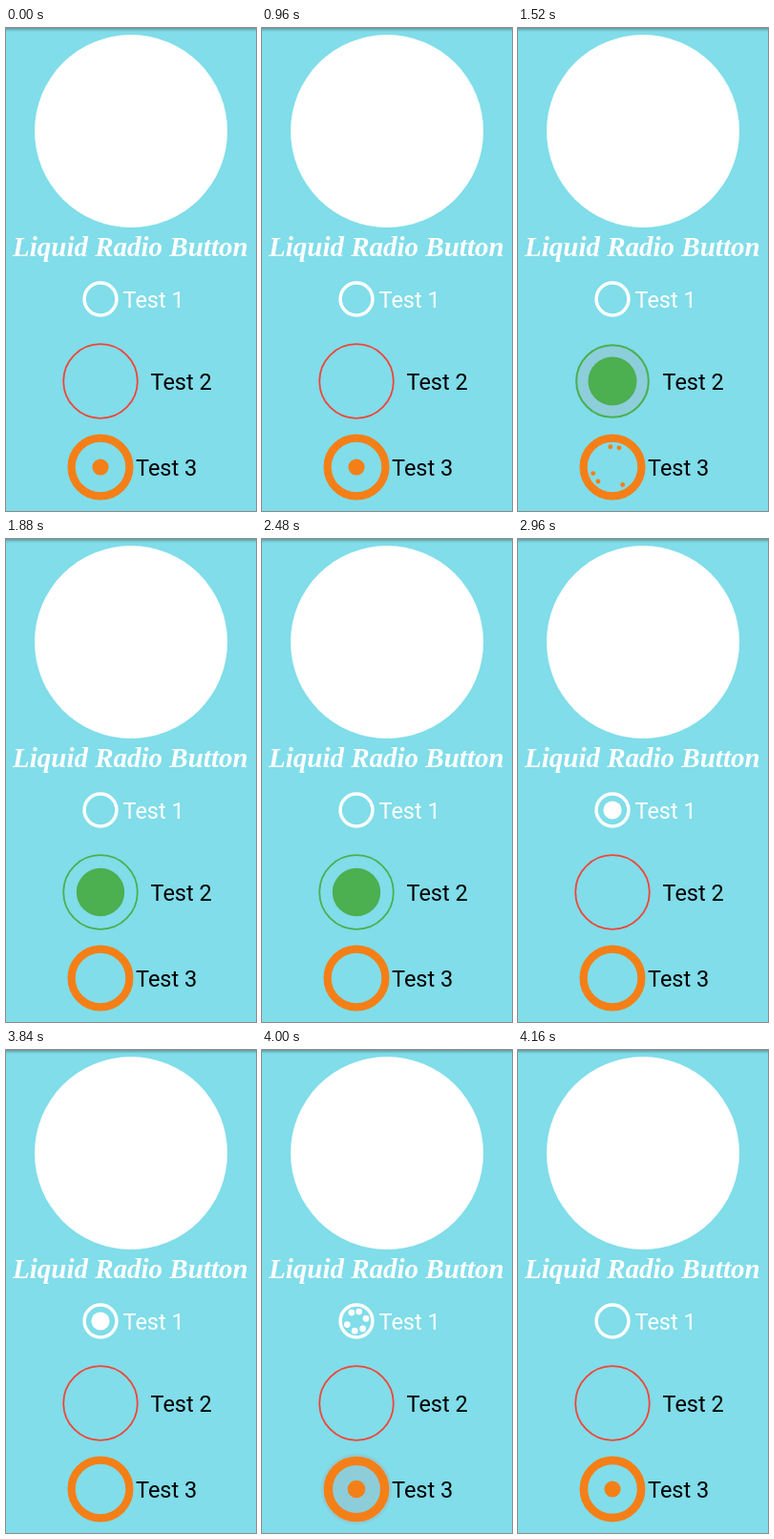
Animation, 262 px wide and 506 px high, one loop 4200 ms. Source, as an HTML page:

```html
<!DOCTYPE html>
<html lang="en">
<head>
<meta charset="utf-8">
<title>Liquid Radio Button</title>
<style>
  html, body { margin: 0; width: 100%; height: 100%; overflow: hidden; background: #80dde9; }
  svg { display: block; width: 100vw; height: 100vh; }
  .label { font: 23.5px Roboto, sans-serif; }
  .title { font: italic bold 29px "Liberation Serif", serif; fill: #fff; }
</style>
</head>
<body>
<svg id="stage" viewBox="0 0 262 506">
  <defs>
    <linearGradient id="shade" x2="0" y2="1">
      <stop offset="0" stop-color="#5f8d95" stop-opacity=".9"/>
      <stop offset=".4" stop-color="#64a2ab" stop-opacity=".55"/>
      <stop offset="1" stop-color="#80dde9" stop-opacity="0"/>
    </linearGradient>
  </defs>
  <rect width="262" height="506" fill="#80dde9"/>
  <rect width="262" height="5" fill="url(#shade)"/>
  <circle cx="131" cy="108" r="101" fill="#fff"/>
  <text class="title" x="7" y="239">Liquid Radio Button</text>
</svg>
<script>
const LOOP = 4200, BURST = 300, CX = 99;
const stage = document.getElementById('stage');

const buttons = [
  { y: 284, r: 16.9, line: 3.5, dot: 9.6, halo: 32, on: '#fff', off: '#fff', text: 'Test 1', tx: 122.5, ty: 293, ink: '#fff' },
  { y: 370, r: 38.8, line: 1.8, dot: 25.2, halo: 37, on: '#4caf50', off: '#f44336', text: 'Test 2', tx: 151.5, ty: 379, ink: '#000' },
  { y: 460, r: 30.4, line: 8.2, dot: 8.6, halo: 37, on: '#f57f17', off: '#f57f17', text: 'Test 3', tx: 136, ty: 469, ink: '#000' }
];

// Each selection: time, button left, button chosen, droplet angles in degrees.
const picks = [
  { at: 1340, from: 2, to: 1, angles: [-96, -71, 162, 135, 60] },
  { at: 2540, from: 1, to: 0, angles: [-137, -108, -26, 51, 90, 135] },
  { at: 3860, from: 0, to: 2, angles: [-120, -75, -15, 50, 100, 160] }
];

const clamp = v => Math.max(0, Math.min(1, v));
const bell = v => Math.sin(Math.PI * clamp(v));

function easeBack(v) {
  const k = v - 1, s = 1.7;
  return 1 + (s + 1) * k ** 3 + s * k ** 2;
}

function add(tag, attrs, parent = stage) {
  const el = document.createElementNS('http://www.w3.org/2000/svg', tag);
  set(el, attrs);
  return parent.appendChild(el);
}

function set(el, attrs) {
  for (const key in attrs) el.setAttribute(key, attrs[key]);
}

for (const b of buttons) {
  const g = add('g', { transform: `translate(${CX} ${b.y})` });
  b.haloEl = add('circle', { fill: '#b09ba8' }, g);
  b.ringEl = add('circle', { fill: 'none' }, g);
  b.dotEl = add('circle', { fill: b.on }, g);
  b.drops = Array.from({ length: 6 }, () => add('circle', { fill: b.off }, g));
  add('text', { class: 'label', x: b.tx, y: b.ty, fill: b.ink }).textContent = b.text;
}

function drawButton(b, i, t) {
  let checked = i === 2, wobble = 0, glow = 0, spread = 0, scale = 1, burst = null, u = 1;
  for (const p of picks) {
    const age = t - p.at;
    if (p.to === i) {
      glow = Math.max(glow, bell((age + 20) / 320));
      spread = Math.max(spread, clamp((age + 20) / 140));
      wobble = Math.max(wobble, bell(age / 340));
    }
    if (age < 0) continue;
    checked = p.to === i;
    if (checked) scale = easeBack(clamp(age / 200));
    if (p.from === i && age < BURST) {
      burst = p;
      u = age / BURST;
    }
  }

  set(b.haloEl, { r: b.halo * spread, opacity: 0.25 * glow });
  set(b.ringEl, {
    r: b.r * (1 - 0.025 * wobble),
    stroke: checked ? b.on : b.off,
    'stroke-width': b.line * (1 + 0.15 * wobble)
  });
  set(b.dotEl, { r: checked ? b.dot * Math.max(0, scale) : 0 });

  const reach = (b.r - b.line / 2) * (1 - (1 - u) ** 1.8);
  b.drops.forEach((drop, n) => {
    const live = burst && n < burst.angles.length;
    const a = live ? burst.angles[n] * Math.PI / 180 : 0;
    set(drop, {
      cx: reach * Math.cos(a),
      cy: reach * Math.sin(a),
      r: live ? b.dot * 0.45 * (1 - u * u) : 0
    });
  });
}

function render(t) {
  buttons.forEach((b, i) => drawButton(b, i, t));
}

const start = performance.now();
function tick() {
  render((performance.now() - start) % LOOP);
  requestAnimationFrame(tick);
}
render(0);
requestAnimationFrame(tick);
</script>
</body>
</html>
```
